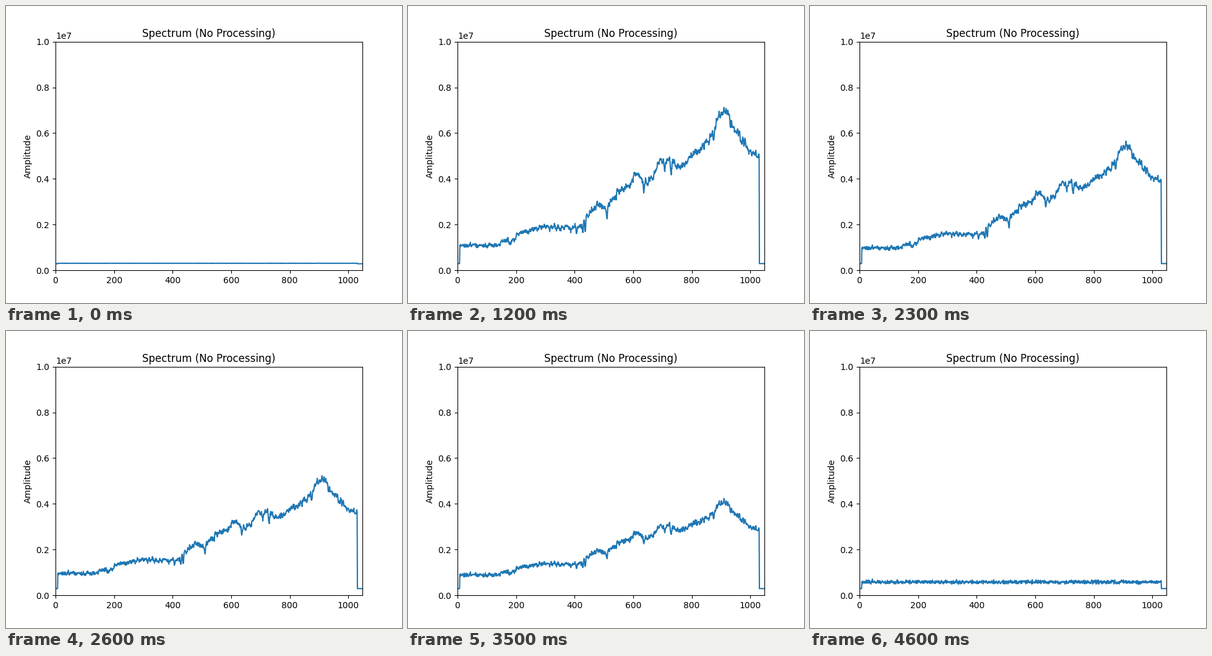
Write a matplotlib script that moves like this. It is 640x480 px and loops after 4700 ms.

```python
import numpy as np
import matplotlib.pyplot as plt
from matplotlib.animation import FuncAnimation

FRAMES, INTERVAL = 47, 100
BINS = 1049
FIRST, LAST = 8, 1030  # lit part of the sensor
DARK, STRAY = 0.3, 0.58  # sensor floor and stray light, in units of 1e6
KNEE, SQUEEZE = 7.0, 0.33  # soft saturation

x = np.arange(BINS)
lit = (x >= FIRST) & (x <= LAST)

# Lamp spectrum: bin, level
LAMP = [
    (8, 1.08), (140, 1.1), (150, 1.28), (195, 1.3), (202, 1.57), (235, 1.68),
    (285, 1.88), (420, 1.9), (440, 2.42), (480, 2.88), (508, 2.65),
    (535, 3.2), (595, 3.88), (605, 4.2), (628, 4.1), (645, 3.75),
    (672, 4.22), (684, 4.72), (718, 4.8), (760, 4.52), (870, 5.85),
    (893, 6.8), (912, 6.98), (945, 6.25), (1000, 5.15), (1030, 4.87),
]

# Absorption lines: centre, relative depth
LINES = [(182, 0.14), (352, 0.1), (386, 0.1), (406, 0.12), (428, 0.22),
         (436, 0.27), (510, 0.18), (636, 0.15), (707, 0.12), (729, 0.1),
         (875, 0.07)]
LINE_WIDTH = 2.2

# Lamp brightness over time: frame, gain, loss towards the high bins
FADE = [(0, 0, 0), (3, 1.14, 0), (6, 1.14, 0), (12, 1, 0), (18, 0.83, 0.01),
        (23, 0.775, 0.02), (24, 0.74, 0.04), (30, 0.74, 0.07),
        (36, 0.585, 0.09), (40, 0.49, 0.135), (42, 0.43, 0.13), (46, 0, 0)]


def build_lamp():
    shape = np.interp(x, *zip(*LAMP))
    for centre, depth in LINES:
        shape *= 1 - depth * np.exp(-((x - centre) / LINE_WIDTH) ** 2)
    return shape - STRAY


def smooth_noise(rng, width):
    kernel = np.hanning(width + 2)
    noise = np.convolve(rng.normal(size=BINS), kernel, mode="same")
    return noise / noise.std()


rng = np.random.default_rng(12)
lamp = build_lamp()
lamp += 0.042 * np.sqrt(lamp) * smooth_noise(rng, 5)
grain = np.clip(rng.normal(0, 0.04, BINS), -0.08, 0.13)


def spectrum(i):
    if i == 0:
        return np.where(lit, DARK + 0.008 + 0.06 * grain, DARK - 0.012) * 1e6
    frames, gains, losses = zip(*FADE)
    gain = np.interp(i, frames, gains)
    loss = np.interp(i, frames, losses)
    level = STRAY + lamp * (gain - loss * (x / 1000) ** 3)
    level = np.where(level > KNEE, KNEE + SQUEEZE * (level - KNEE), level)
    shot = np.random.default_rng(100 + i).normal(0, 0.01, BINS)
    signal = level + grain + shot * np.sqrt(level)
    return np.where(lit, signal, DARK - 0.005) * 1e6


fig, ax = plt.subplots(figsize=(6.4, 4.8), dpi=100)
ax.set(xlim=(0, BINS - 1), ylim=(0, 1e7), ylabel="Amplitude")
ax.set_title("Spectrum (No Processing)", pad=5.3)
line, = ax.plot(x, spectrum(0), color="#1f77b4", lw=1.5)


def update(i):
    line.set_ydata(spectrum(i))
    return line,


anim = FuncAnimation(fig, update, frames=FRAMES, interval=INTERVAL,
                     repeat=True, repeat_delay=0)
plt.show()
```
